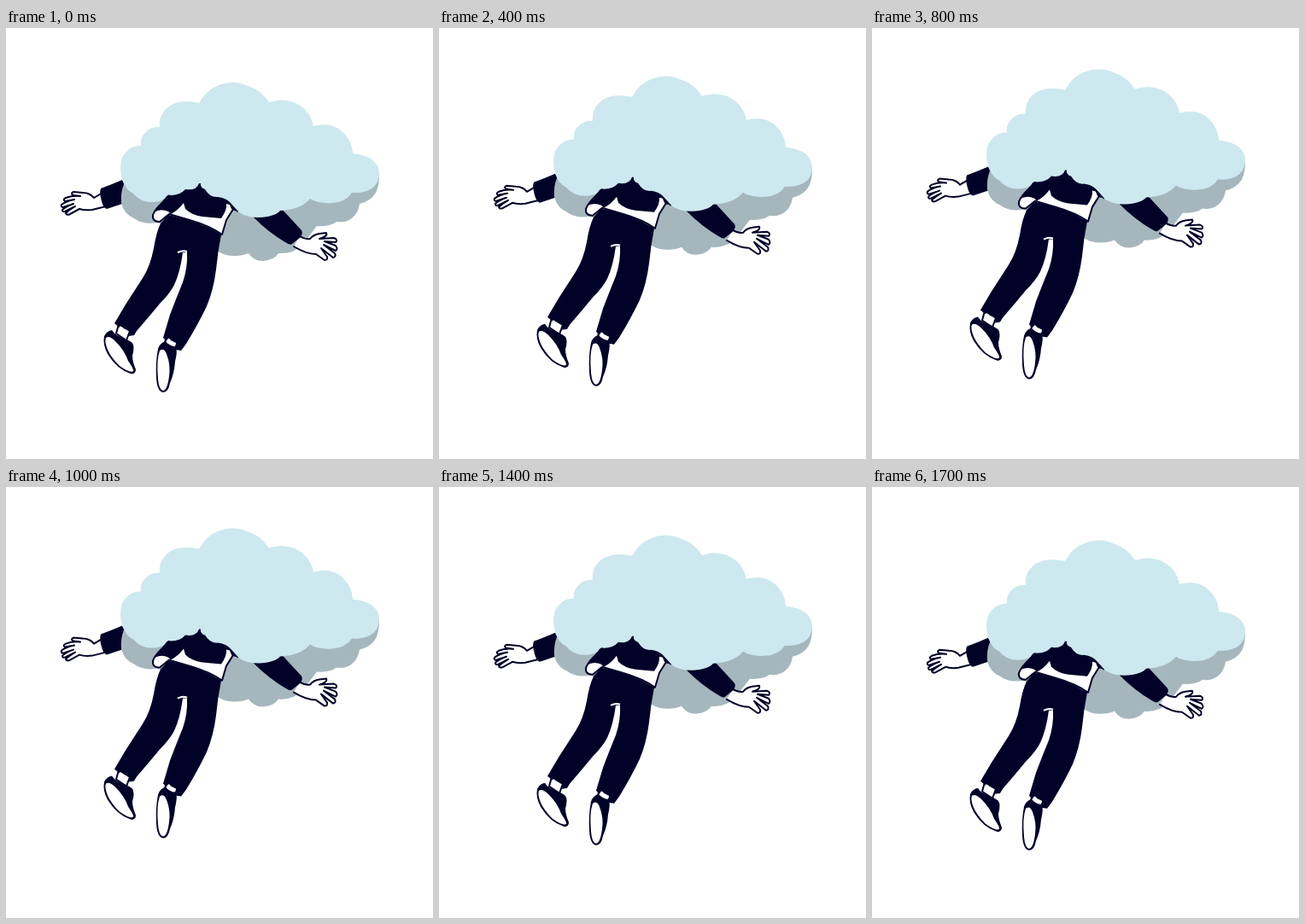
An HTML page that plays this animation: 500 by 505 pixels, repeating every 1.8 s.

```html
<!DOCTYPE html>
<html lang="en">
<head>
<meta charset="utf-8">
<title>Head in the clouds</title>
<style>
  html, body { margin: 0; width: 100%; height: 100%; overflow: hidden; background: #fff; }
  svg { display: block; width: 100vw; height: 100vh; }
  .ink { fill: #020229; }
  .line { fill: #fff; stroke: #020229; stroke-width: 2; stroke-linejoin: round; stroke-linecap: round; }
  .paper { fill: #fff; }
  .shade { fill: #a5b7bd; }
  .cloud { fill: #cee8ef; }
</style>
</head>
<body>
<svg viewBox="0 0 500 505">
  <g id="drift">
    <!-- left arm -->
    <path class="line" d="M113 193L103 199Q98 193 90 193L79 192Q75 194 79 196L87 197Q78 196 70 199Q66 201 69 203L80 201Q70 203 65 207Q64 210 67 210L79 206Q70 209 66 213Q66 216 69 215L81 209Q74 213 70 217Q71 220 75 218L86 212Q92 214 101 213L117 209"/>
    <path class="ink" d="M111 188L124 183L136 178L142 190L136 206L118 212Q114 211 112 203Q109 193 111 188Z"/>

    <!-- cloud underside -->
    <path class="shade" d="M138 183Q134 193 135 205Q138 218 150 223Q160 231 178 228L200 240L249 262Q256 267 268 267Q277 267 284 264Q290 273 301 273Q314 272 319 264Q337 265 347 254L364 232Q380 233 387 227Q400 229 408 220Q413 214 414 206Q427 203 433 193Q437 185 437 172L300 160Z"/>

    <!-- right arm -->
    <path class="line" d="M344 244Q351 248 356 247Q360 242 367 241L375 240Q377 243 370 246L367 247L384 246Q389 248 386 251L373 250L386 255Q389 259 386 261L372 254L385 264Q387 268 383 269L369 258L376 268Q377 272 373 272L363 265Q352 265 337 256"/>
    <path class="ink" d="M286 216L322 211L346 237Q348 240 345 245L335 253Q333 255 327 251Q308 240 290 222Z"/>

    <!-- shoes and socks -->
    <path class="line" d="M132 347L129 358L141 366L145 355Z"/>
    <path class="line" d="M188 360L186 369L198 376L201 367Z"/>
    <path class="ink" d="M115 361Q118 355 124 354Q128 360 134 362Q143 365 148 369Q151 374 148 384Q148 391 152 400Q152 406 146 405Q130 400 119 382Q113 371 115 361Z"/>
    <path class="paper" d="M117 363Q121 360 128 367Q139 378 143 390Q150 400 149 402Q146 405 133 396Q123 386 119 377Q115 367 117 363Z"/>
    <path class="ink" d="M178 376Q180 369 187 367Q191 373 199 373Q201 379 198 391Q197 405 192 416Q190 427 184 427Q177 426 176 410Q175 391 178 376Z"/>
    <path class="paper" d="M180 378Q185 374 188 382Q193 395 191 408Q189 424 184 425Q179 424 178 411Q176 389 180 378Z"/>

    <!-- trousers -->
    <path class="ink" d="M190 219L181 229Q176 239 173 258Q169 279 160 293L140 324L127 346L133 351Q134 346 138 352L145 355L144 361L150 360L153 355Q166 340 180 323Q192 311 197 301Q204 286 207 263L212 263Q213 280 207 298Q200 315 192 336L184 363L188 367Q190 361 193 366L199 369L199 377L205 378L211 370Q225 347 235 326Q243 307 246 283Q248 262 252 242Q226 226 190 219Z"/>
    <path d="M201 263Q207 260 212 262" fill="none" stroke="#fff" stroke-width="2"/>

    <!-- jacket and shirt -->
    <path class="line" d="M187 201Q175 211 172 219Q171 227 180 227L191 218L215 225Q239 232 253 242L258 225L268 209L258 202L210 195Z"/>
    <path class="ink" d="M188 196L180 208L173 216Q181 211 190 215L193 218Q201 214 208 205L210 212Q217 219 230 221L252 223Q259 213 258 206L266 208L271 216L273 214L262 195L228 180L207 187Z"/>
    <path class="ink" d="M261 205Q269 209 273 215L267 214L264 212Z"/>

    <!-- cloud -->
    <path class="cloud" d="M158 138Q144 137 136 152Q132 163 136 177Q140 190 149 194Q157 204 171 204Q180 204 186 200Q189 194 193 196Q204 196 210 189Q223 191 226 182L228 182Q227 187 233 189Q239 199 248 198Q257 199 262 204L273 216Q281 222 296 222Q315 221 321 214Q345 213 356 200Q365 206 382 205Q398 204 405 193Q422 194 431 186Q437 180 437 169Q435 150 406 147Q405 130 391 119Q378 110 360 115Q356 95 337 87Q323 82 308 87Q299 73 284 68Q266 60 249 67Q235 72 226 88Q206 83 192 91Q178 101 180 116Q168 115 161 125Q157 130 158 138Z"/>
  </g>
</svg>
<script>
  const drift = document.getElementById("drift");
  const LOOP = 1800, STEP = 100;
  // height risen at each step of the way up; the way down mirrors it
  const rise = [0, 1.2, 3.5, 5.3, 7.2, 9.8, 11.8, 13.8, 15.4, 16];

  function render(ms) {
    const step = Math.floor((ms % LOOP) / STEP);
    const y = rise[Math.min(step, LOOP / STEP - step)];
    drift.setAttribute("transform", `translate(0 ${-y})`);
  }

  const start = performance.now();
  function tick() {
    render(performance.now() - start);
    requestAnimationFrame(tick);
  }
  tick();
</script>
</body>
</html>
```
